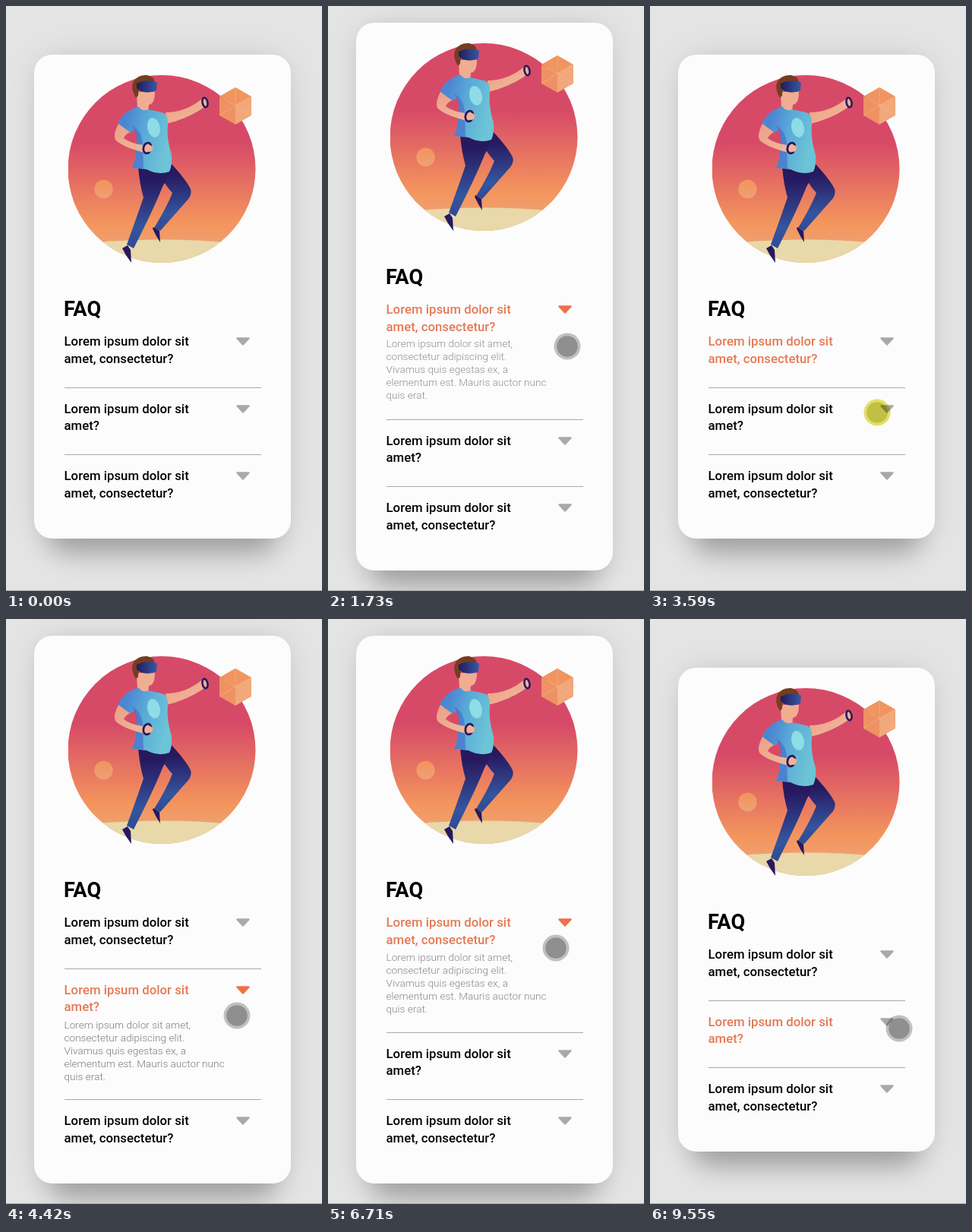
An HTML page for the animation above (9.62 s loop, 416 by 770 pixels).

```html
<!DOCTYPE html>
<html lang="en">
<head>
<meta charset="utf-8">
<title>FAQ accordion</title>
<style>
  html, body { margin: 0; width: 100%; height: 100%; overflow: hidden; background: #e4e4e4; }
  svg { display: block; width: 416px; height: 770px; font-family: Roboto, sans-serif; }
  .halo { filter: blur(22px); opacity: .07; }
  .drop { filter: blur(17px); opacity: .27; }
  .title { font-size: 27.2px; font-weight: 700; }
  .question { font-size: 16.8px; font-weight: 500; }
  .answer { font-size: 13.6px; font-weight: 300; fill: #555; }
  #cursor { mix-blend-mode: multiply; }
</style>
</head>
<body>
<svg viewBox="0 0 416 770">
  <defs>
    <linearGradient id="sky" x2="0" y2="1">
      <stop offset=".36" stop-color="#d74a67"/>
      <stop offset=".78" stop-color="#f3945d"/>
      <stop offset="1" stop-color="#edaa7c"/>
    </linearGradient>
    <linearGradient id="ball" x2="0" y2="1">
      <stop stop-color="#f3945c"/><stop offset="1" stop-color="#eea077"/>
    </linearGradient>
    <linearGradient id="shirt" y2=".3">
      <stop offset=".2" stop-color="#4b86d2"/><stop offset=".55" stop-color="#5aa9d8"/>
      <stop offset="1" stop-color="#6cc4d6"/>
    </linearGradient>
    <linearGradient id="leg" x2="0" y2="1">
      <stop offset=".15" stop-color="#27195f"/><stop offset=".75" stop-color="#34559f"/>
      <stop offset="1" stop-color="#2f4a94"/>
    </linearGradient>
    <linearGradient id="skin" x2="1" y2="1">
      <stop stop-color="#ec9f86"/><stop offset="1" stop-color="#f3bb9c"/>
    </linearGradient>
    <linearGradient id="visor">
      <stop stop-color="#221a5c"/><stop offset="1" stop-color="#355aa6"/>
    </linearGradient>
    <clipPath id="disc"><circle cx="205" cy="214.5" r="123.5"/></clipPath>
  </defs>

  <rect class="halo stretch" x="37" y="64" width="338" rx="24"/>
  <rect class="drop stretch" x="56" y="84" width="300" rx="24"/>
  <rect y="769" width="416" height="1" fill="#a8a8a8"/>
  <rect class="stretch" x="37" y="64" width="338" rx="24" fill="#fcfcfc"/>

  <g id="content">
    <g clip-path="url(#disc)">
      <rect x="82" y="91" width="247" height="247" fill="url(#sky)"/>
      <path d="M120 311Q205 304 288 311V340H120Z" fill="#e8d8aa"/>
    </g>
    <circle cx="128.5" cy="241" r="12.2" fill="url(#ball)"/>

    <path d="M302 107L323 119L302 131L281 119Z" fill="#f0955f"/>
    <path d="M281 119L302 131V156L281 144Z" fill="#ee9264"/>
    <path d="M323 119L302 131V156L323 144Z" fill="#f1a87b"/>
    <path d="M302 107V131L281 144M302 131L323 144" fill="none" stroke="#f6c19b" stroke-opacity=".45"/>

    <!-- legs and shoes -->
    <path d="M203 208L218 208Q238 230 243 241Q245 246 241 253L203 296L195 292Q212 264 219 246Q208 234 203 222Z" fill="url(#leg)"/>
    <path d="M194 291L202 296L203 311L198 303L193 293Z" fill="#27195f"/>
    <path d="M174 212L216 214Q213 226 206 238Q195 266 168 319L159 314Q170 284 181 252Q176 235 174 212Z" fill="url(#leg)"/>
    <path d="M153 319L160 315L164 321L165 338L158 328Z" fill="#27195f"/>

    <!-- far arm, neck, shirt -->
    <path d="M210 140Q236 140 257 123Q262 120 266 124Q267 131 261 133Q240 148 211 155Z" fill="url(#skin)"/>
    <ellipse cx="262" cy="127" rx="3.4" ry="6.4" fill="none" stroke="#27195f" stroke-width="2.6" transform="rotate(-12 262 127)"/>
    <path d="M172 113H196Q196 129 188 130L187 143L173 136Z" fill="#f0ad92"/>
    <path d="M165 136L174 132Q180 140 187 136L205 140Q214 142 213 156Q211 174 218 196Q219 210 215 218Q200 223 185 215L166 213Q172 201 171 185Q175 172 170 162L163 167L147 155Q152 143 165 136Z" fill="url(#shirt)"/>
    <path d="M166 157Q180 165 180 184L181 214L166 213Q172 201 171 185Q175 172 166 157Z" fill="#4774cb" opacity=".75"/>
    <ellipse cx="194.500" cy="160" rx="8.300" ry="13" fill="#8edce5" transform="rotate(-12 194.500 160)"/>

    <!-- near arm -->
    <path d="M148 155L163 166Q157 169 155 174Q164 181 181 183Q190 179 194 185Q192 193 183 193Q157 187 146 178Q139 173 148 155Z" fill="url(#skin)"/>
    <ellipse cx="186" cy="187" rx="5" ry="7" fill="none" stroke="#27195f" stroke-width="2.800" transform="rotate(14 186 187)"/>
    <circle cx="188.500" cy="187.500" r="4.500" fill="#f1b296"/>

    <!-- head -->
    <path d="M171 121Q163 108 168 99Q174 90 186 91Q196 93 196 102L178 104Q174 111 174 118Z" fill="#753d20"/>
    <path d="M172 102L180 99Q192 97 199 101L198 111Q188 116 177 112L172 108Z" fill="url(#visor)"/>

    <text class="title" x="76" y="408">FAQ</text>
    <g id="list"></g>
  </g>

  <g id="cursor">
    <circle r="17.500"/>
    <circle r="13.800"/>
  </g>
</svg>
<script>
const LOOP = 9620, GROW = 84, SLIDE = 1500, DROP = 20;
const ORANGE = '#e47a56';
const questions = [
  ['Lorem ipsum dolor sit', 'amet, consectetur?'],
  ['Lorem ipsum dolor sit', 'amet?'],
  ['Lorem ipsum dolor sit', 'amet, consectetur?']
];
const answer = ['Lorem ipsum dolor sit amet,', 'consectetur adipiscing elit.',
  'Vivamus quis egestas ex, a', 'elementum est. Mauris auctor nunc', 'quis erat.'];

// [time the item toggles, item, opens]
const toggles = [[1190, 0, 1], [2670, 0, 0], [3720, 1, 1], [4960, 2, 1],
  [6100, 0, 1], [7330, 1, 1], [8950, 1, 0]];
const PRESS = 130, RELEASE = 140;

// pointer stops: [time, x, y]
const stops = [[190, 397, 755], [920, 312, 454], [1330, 312, 454], [1730, 315, 448],
  [2000, 312, 415], [2750, 312, 415], [3330, 299, 535], [3860, 299, 535], [4400, 304, 522],
  [4620, 304, 522], [4830, 308, 660], [5100, 308, 660], [5500, 309, 609], [5640, 309, 609],
  [5970, 301, 412], [6240, 301, 412], [6680, 300, 433], [6740, 300, 433], [6930, 300, 424],
  [7040, 300, 424], [7220, 309, 570], [7470, 309, 570], [8020, 309, 505], [8410, 313, 502],
  [9549, 313, 502], [9550, 328, 539]];

const $ = id => document.getElementById(id);
const lines = (rows, y, step) =>
  rows.map((s, i) => `<text x="76.500" y="${Math.round(y + i * step)}">${s}</text>`).join('');

$('list').innerHTML = questions.map((q, i) => {
  const y = 447 + 88.5 * i, arrow = Math.round(y) - 6;
  return `<g class="item">
    <g class="question">${lines(q, y, 22.6)}</g>
    <path class="arrow" d="M304.500 ${arrow - 3.500}H319.500L312 ${arrow + 4.500}Z" stroke-width="2.500" stroke-linejoin="round"/>
    <g class="answer">${lines(answer, Math.round(y + 22.6) + 28, 17)}</g>
    ${i < 2 ? `<rect class="rule" x="77" y="${502 + 88 * i}" width="259" height="1" fill="#a9a9a9"/>` : ''}
  </g>`;
}).join('');

const items = [...document.querySelectorAll('.item')].map(el => ({
  el, ...Object.fromEntries(['question', 'arrow', 'answer', 'rule'].map(c => [c, el.querySelector('.' + c)]))
}));
const stretch = [...document.querySelectorAll('.stretch')];
const [ring, core] = $('cursor').children;
const move = (el, x, y) => el.setAttribute('transform', `translate(${x} ${y})`);

function pointer(t) {
  const n = stops.findIndex(s => s[0] > t);
  if (n < 0) return stops.at(-1).slice(1);
  const [t0, x0, y0] = stops[n - 1], [t1, x1, y1] = stops[n];
  const p = (t - t0) / (t1 - t0), k = p * p * (3 - 2 * p);
  return [x0 + (x1 - x0) * k, y0 + (y1 - y0) * k];
}

function render(t) {
  const [since, focus, opened] = toggles.findLast(e => e[0] <= t) || [0, -1, 0];
  const open = opened ? focus : -1;
  const lift = opened ? -GROW / 2 : 0;

  move($('content'), 0, lift);
  for (const r of stretch) {
    r.setAttribute('height', 637 - 2 * lift);
    move(r, 0, lift);
  }

  const left = 1 - Math.min(1, (t - since) / SLIDE);
  const rest = left ** 2.3;
  items.forEach((it, i) => {
    move(it.el, 0, opened && i > open ? GROW : 0);
    it.question.setAttribute('fill', i === focus ? ORANGE : '#000');
    const color = i === open ? '#ed7048' : '#a9a9a9';
    it.arrow.setAttribute('fill', color);
    it.arrow.setAttribute('stroke', color);
    it.answer.setAttribute('opacity', i === open ? 1 - rest : 0);
    move(it.answer, 0, -Math.round(DROP * rest));
    if (it.rule) move(it.rule, 0, i === open ? GROW : 0);
  });

  const shown = t >= stops[0][0];
  $('cursor').setAttribute('visibility', shown ? 'visible' : 'hidden');
  if (shown) move($('cursor'), ...pointer(t));
  const pressed = toggles.some(([at]) => t >= at - PRESS && t < at + RELEASE);
  ring.setAttribute('fill', pressed ? '#e3e36c' : '#c3c3c3');
  core.setAttribute('fill', pressed ? '#c4c343' : '#919191');
}

const start = performance.now();
function tick() {
  render((performance.now() - start) % LOOP);
  requestAnimationFrame(tick);
}
tick();
</script>
</body>
</html>
```
